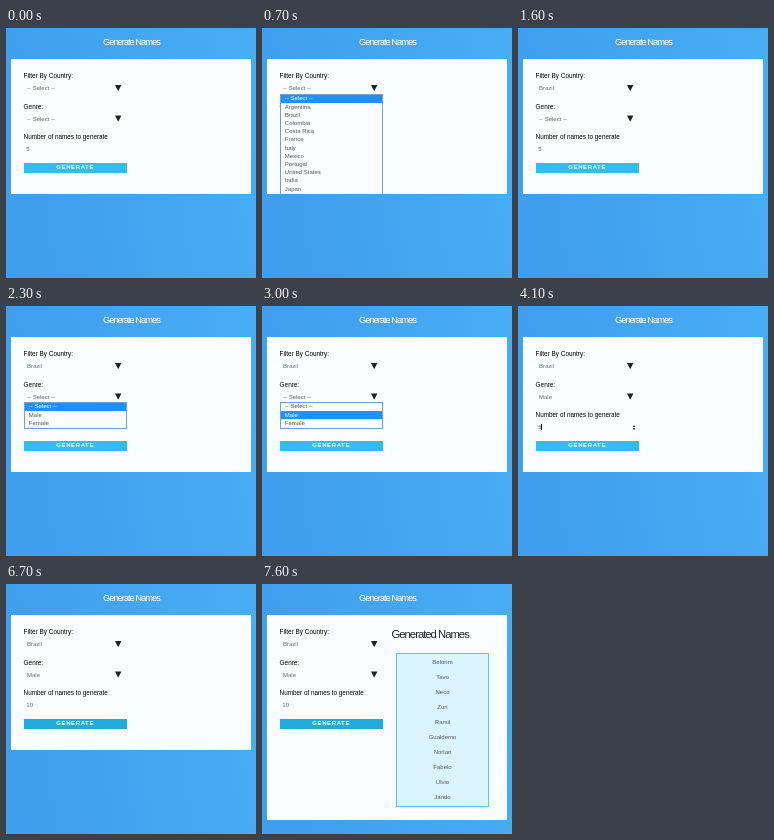
An HTML page with a canvas that plays this animation: 250x250 px, repeating every 8000 ms.

```html
<!DOCTYPE html>
<html lang="en">
<head>
<meta charset="utf-8">
<title>Generate Names</title>
<style>
html, body { margin: 0; width: 100%; height: 100%; overflow: hidden; }
canvas { display: block; width: 250px; height: 250px; }
</style>
</head>
<body>
<canvas id="stage"></canvas>
<script>
const SIZE = 250;
const LOOP = 8000;
const FONT = '"Liberation Sans", Arial, sans-serif';
const ROW = 8.2;
const NONE = '-- Select --';
const COUNTRIES = [NONE, 'Argentina', 'Brazil', 'Colombia', 'Costa Rica', 'France', 'Italy',
  'Mexico', 'Portugal', 'United States', 'India', 'Japan'];
const GENRES = [NONE, 'Male', 'Female'];
const RESULTS = ['Belorim', 'Tavo', 'Neco', 'Zuri', 'Ramil', 'Gualdemo', 'Norlan', 'Fabelo', 'Ulvio', 'Jando'];

const canvas = document.getElementById('stage');
const ctx = canvas.getContext('2d');
const ratio = window.devicePixelRatio || 1;
canvas.width = canvas.height = SIZE * ratio;
ctx.scale(ratio, ratio);

function rect(x, y, w, h, color) {
  ctx.fillStyle = color;
  ctx.fillRect(x, y, w, h);
}

function text(str, x, y, size, color, { weight = 'normal', align = 'left', spacing = 0 } = {}) {
  ctx.font = `${weight} ${size}px ${FONT}`;
  ctx.letterSpacing = spacing + 'px';
  ctx.textAlign = align;
  ctx.fillStyle = color;
  ctx.fillText(str, x, y);
}

function triangle(x, y, w, h, color) {
  ctx.fillStyle = color;
  ctx.beginPath();
  ctx.moveTo(x, y);
  ctx.lineTo(x + w, y);
  ctx.lineTo(x + w / 2, y + h);
  ctx.fill();
}

function background() {
  const fill = ctx.createLinearGradient(0, 40, 250, 0);
  fill.addColorStop(0, '#3f9eee');
  fill.addColorStop(1, '#48aef3');
  rect(0, 0, SIZE, SIZE, fill);
  text('Generate Names', 97, 17.2, 9.4, '#fff', { spacing: -1.04 });
}

function select(label, value, y) {
  text(label, 17.6, y, 6.4, '#000');
  text(value, 21, y + 12.2, 6, value === NONE ? '#666' : '#5f6f88');
  triangle(109, y + 7, 6.4, 6.2, '#222');
}

function dropdown(options, top, bottom, active) {
  ctx.save();
  ctx.beginPath();
  ctx.rect(18, top, 103, bottom - top);
  ctx.clip();
  rect(18, top, 103, bottom - top, '#fafdff');
  options.forEach((option, i) => {
    const y = top + 0.8 + i * ROW;
    if (i === active) rect(19, y, 101, ROW, '#1e90ff');
    text(option, 22.8, y + 5.6, 6, i === active ? '#fff' : '#555');
  });
  ctx.restore();
}

function frame(x, y, w, h, color) {
  ctx.strokeStyle = color;
  ctx.lineWidth = 1;
  ctx.strokeRect(x + 0.5, y + 0.5, w - 1, h - 1);
}

function countryList(t) {
  const bottom = t < 700 ? 116 : 166;
  dropdown(COUNTRIES, 66, bottom, t < 1100 ? 0 : 2);
  ctx.save();
  ctx.beginPath();
  ctx.rect(18, 66, 103, bottom - 66);
  ctx.clip();
  frame(18, 66, 103, bottom - 65, '#6f9fdd');
  ctx.restore();
}

function genreList(t) {
  dropdown(GENRES, 96, 123, t < 3000 ? 0 : 1);
  frame(18, 96, 103, 27, '#6f9fdd');
}

function numberField(t) {
  const value = t < 5100 ? '5' : t < 5600 ? '' : t < 5700 ? '1' : '10';
  text('Number of names to generate', 17.6, 111, 6.35, '#000');
  text(value, 20.3, 123.2, 6, t >= 6700 ? '#5f6f88' : '#555');

  const caretOn = t >= 4100 && t < 6200 && !(t >= 4600 && t < 5100);
  if (caretOn) rect(20 + Math.ceil(value.length * 3.4) - (value ? 1 : 0), 118, 1, 6, '#111');

  if (t >= 3700 && t < 4100) rect(115, 120, 2, 3, '#dce3e8');
  if (t >= 4100 && t < 6700) {
    triangle(114.5, 121, 3, -2, '#333');
    triangle(114.5, 122, 3, 2, '#333');
  }
}

function results() {
  text('Generated Names', 129.5, 53.8, 11.3, '#222', { spacing: -1 });
  rect(134, 69, 93, 154, '#d9f4fd');
  frame(134, 69, 93, 154, '#52c8ef');
  RESULTS.forEach((name, i) => text(name, 180.5, 80.2 + i * 15, 6, '#555', { align: 'center' }));
}

function draw(t) {
  const done = t >= 7600;
  background();
  rect(5, 31, 240, done ? 205 : 135, '#fafdff');
  select('Filter By Country:', t < 1600 ? NONE : 'Brazil', 50);
  select('Genre:', t < 3400 ? NONE : 'Male', 80.6);
  numberField(t);
  rect(18, 135, 103, 10, t < 6200 ? '#33bdef' : '#1fabdb');
  text('GENERATE', 50.3, 141.4, 6, '#fff', { weight: 'bold', spacing: 0.6 });
  if (t >= 600 && t < 1600) countryList(t);
  if (t >= 2300 && t < 3400) genreList(t);
  if (done) results();
}

const start = performance.now();
function tick() {
  draw((performance.now() - start) % LOOP);
  requestAnimationFrame(tick);
}
tick();
</script>
</body>
</html>
```
